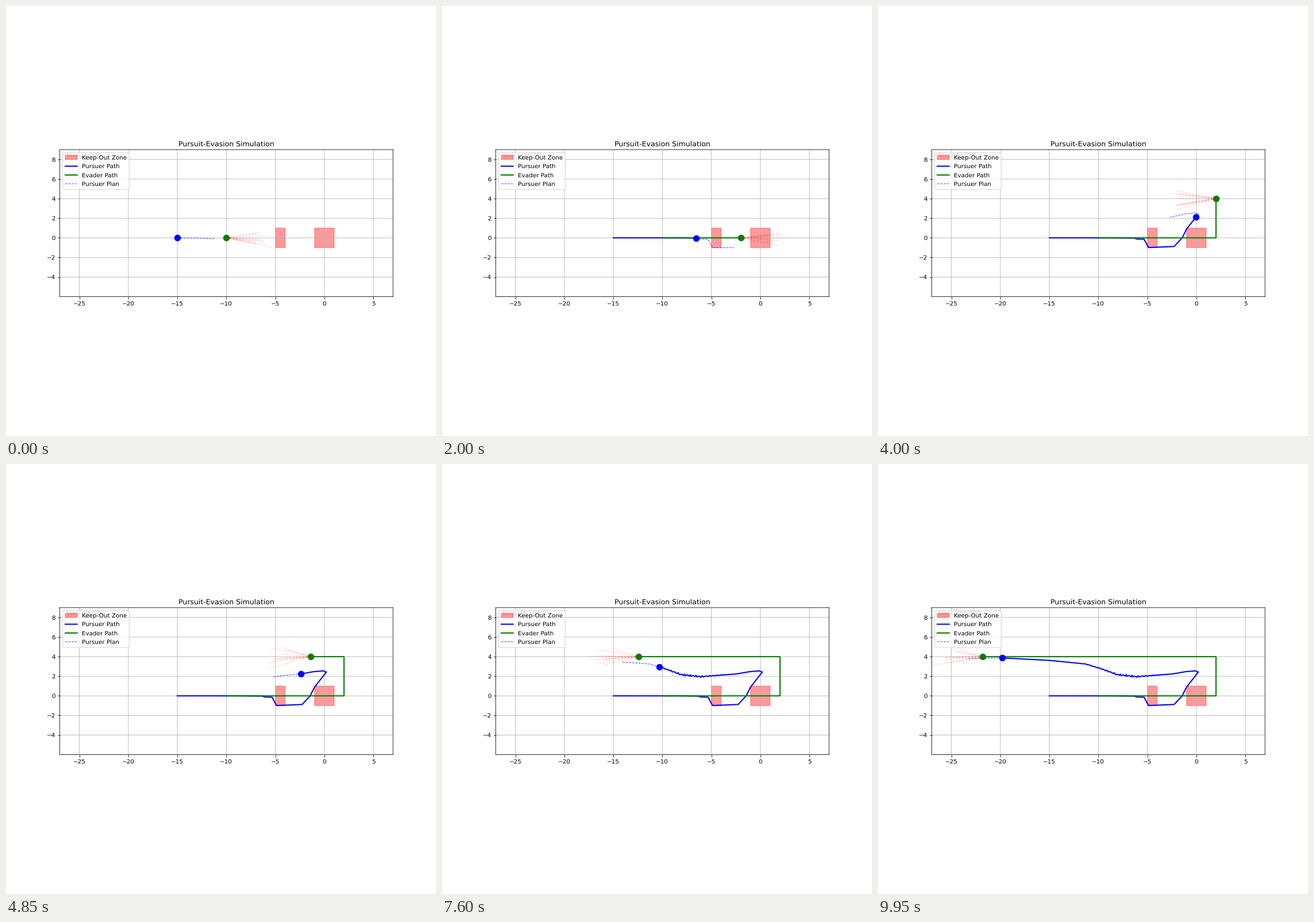
A matplotlib script for the animation above (10 s loop, 748x748 px).

```python
import numpy as np
import matplotlib.pyplot as plt
from matplotlib.animation import FuncAnimation
from matplotlib.patches import Rectangle

STEPS = 200
SPEED = 0.2
HORIZON = 19
STRANDS = 10

# Turning points of the pursuer: step, x, y
TURNS = [
    (0, -15, 0), (32, -8.5, 0), (41, -6.3, -0.03), (42, -6.1, -0.12), (45, -5.35, -0.13),
    (49, -4.88, -0.99), (61, -2.27, -0.88), (67, -1.45, 0), (72, -1, 0.9), (82, 0.2, 2.43),
    (84, -0.1, 2.55), (90, -1.15, 2.46), (97, -2.4, 2.24), (121, -6.1, 1.96),
    (138, -8.1, 2.18), (149, -9.7, 2.76), (157, -11.3, 3.25), (175, -15, 3.62),
    (199, -19.8, 3.87), (219, -23.6, 3.87),
]


def pursuer_route(t):
    ts, xs, ys = np.transpose(TURNS)
    return np.column_stack([np.interp(t, ts, xs), np.interp(t, ts, ys)])


def pursuer_path():
    t = np.arange(STEPS)
    # replanning jitter, strongest on the slow stretch
    amp = 0.09 * np.exp(-((t - 130) / 22) ** 2)
    phase = 2 * np.pi * t / 2.5
    jitter = np.column_stack([0.6 * np.sin(phase), np.cos(phase)])
    return pursuer_route(t) + amp[:, None] * jitter


def evader_path():
    s = np.arange(STEPS + 1) * SPEED
    x = np.where(s < 16, np.minimum(s - 10, 2), 18 - s)
    return np.column_stack([x, np.clip(s - 12, 0, 4)])


def plan(i):
    k = np.arange(HORIZON + 1)
    pts = pursuer_route(i + k)
    pts[:, 1] -= 0.1 * (k / HORIZON) ** 2
    pts[0] = pursuer[i]
    return pts


def prediction_ends():
    rng = np.random.default_rng(7)
    ahead = rng.normal(3.7, 0.75, (STEPS, STRANDS, 1))
    side = rng.normal(0, 0.7, (STEPS, STRANDS, 1))
    u = (np.diff(evader, axis=0) / SPEED)[:, None]
    normal = np.stack([-u[..., 1], u[..., 0]], axis=-1)
    return evader[:-1, None] + ahead * u + side * normal


pursuer, evader = pursuer_path(), evader_path()
ends = prediction_ends()

plt.rcParams.update({
    "font.family": "DejaVu Sans",
    "path.snap": False,
    "text.hinting": "none",
})
fig, ax = plt.subplots(figsize=(10, 10), dpi=74.8)
ax.set(xlim=(-27, 7), ylim=(-6, 9), aspect="equal", title="Pursuit-Evasion Simulation")
ax.set_xticks(range(-25, 6, 5))
ax.set_yticks(range(-4, 9, 2))
ax.grid(True)

for x, width, label in [(-5, 1, "Keep-Out Zone"), (-1, 2, None)]:
    ax.add_patch(Rectangle((x, -1), width, 2, color="red", alpha=0.4, label=label))

pursuer_line, = ax.plot([], [], "b-", lw=2, label="Pursuer Path")
evader_line, = ax.plot([], [], "g-", lw=2, label="Evader Path")
pursuer_dot, = ax.plot([], [], "bo", ms=10)
evader_dot, = ax.plot([], [], "go", ms=10)
plan_line, = ax.plot([], [], "b--", lw=1, alpha=0.7, label="Pursuer Plan")
strands = [ax.plot([], [], "r--", lw=1, alpha=0.2)[0] for _ in range(STRANDS)]
step_text = ax.text(0.02, 0.95, "", transform=ax.transAxes)
ax.legend(loc="upper left", labelspacing=0.54, borderpad=0.42)


def update(i):
    pursuer_line.set_data(*pursuer[:i + 1].T)
    evader_line.set_data(*evader[:i + 1].T)
    pursuer_dot.set_data(*pursuer[i:i + 1].T)
    evader_dot.set_data(*evader[i:i + 1].T)
    plan_line.set_data(*plan(i).T)
    for line, end in zip(strands, ends[i]):
        line.set_data(*np.transpose([evader[i], end]))
    step_text.set_text(f"Step: {i + 1}/{STEPS}")
    return [pursuer_line, evader_line, pursuer_dot, evader_dot, plan_line, step_text, *strands]


anim = FuncAnimation(fig, update, frames=STEPS, interval=50, repeat=True)
plt.show()
```
